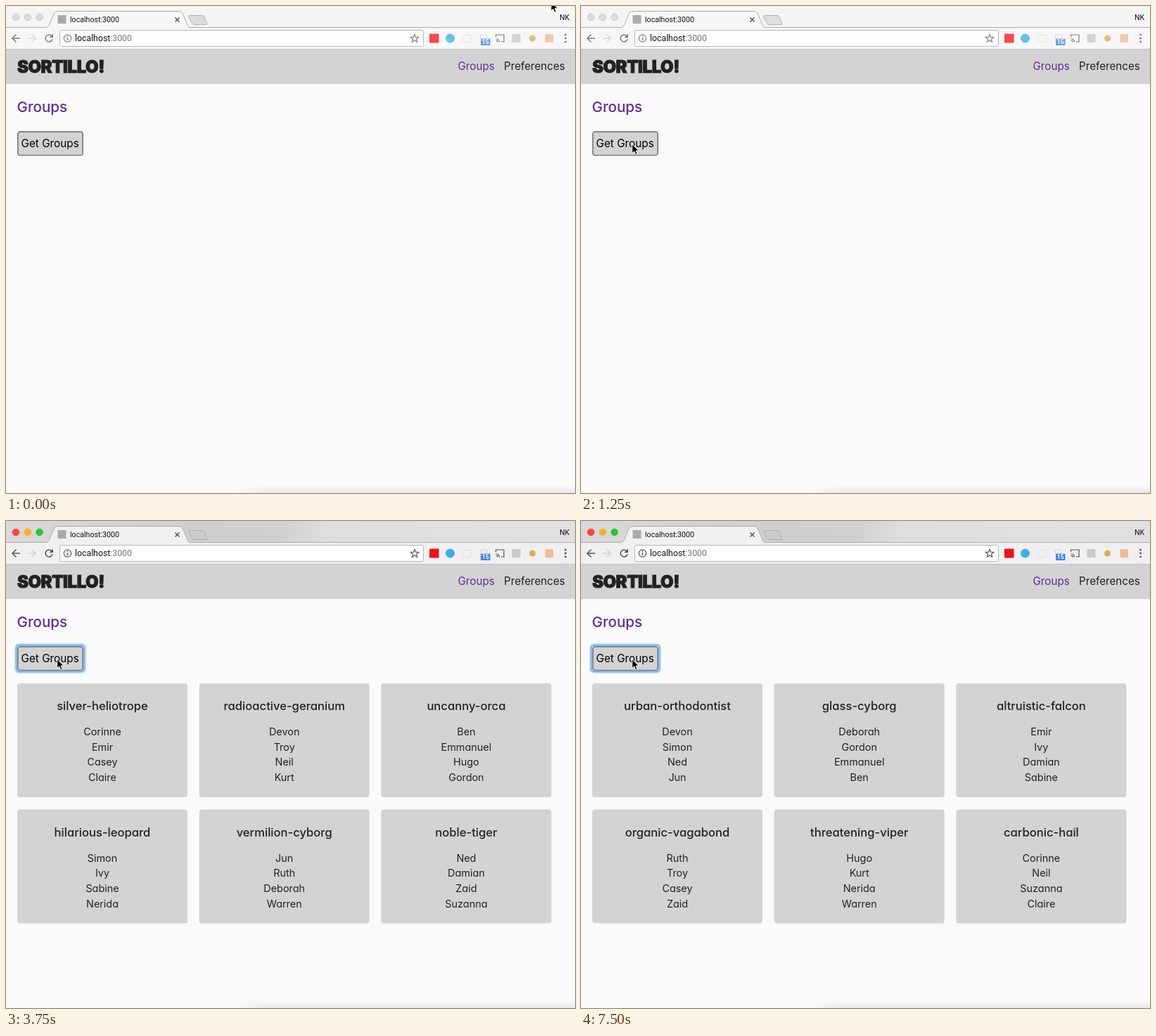
Recreate the animation shown at these times as an HTML page. Size 809 by 693 pixels, loop 8 s.

```html
<!DOCTYPE html>
<html lang="en">
<head>
<meta charset="utf-8">
<title>Groups</title>
<style>
  html, body { margin: 0; width: 100%; height: 100%; overflow: hidden; background: #fafafa; }
  svg { display: block; width: 809px; height: 693px; }
  text { font-family: Inter, "Open Sans", sans-serif; font-feature-settings: "cv11"; fill: #212121; }
  .ui { font-family: Roboto, "Liberation Sans", sans-serif; fill: #111; }
  .logo { font-size: 24px; font-weight: 900; letter-spacing: -.5px; stroke: #212121; stroke-width: .9px; }
  .nav { font-size: 15.2px; }
  .title { font-size: 20.6px; font-weight: 500; }
  .head { font-size: 16.6px; font-weight: 500; text-anchor: middle; }
  .name { font-size: 14.4px; text-anchor: middle; }
  .purple { fill: #5f2c97; }
  .line { fill: none; stroke: #555; stroke-width: 1.5; }
</style>
</head>
<body>
<svg viewBox="0 0 809 693">
  <defs>
    <linearGradient id="strip">
      <stop offset="0" stop-color="#dad8d8"/>
      <stop offset=".33" stop-color="#d0cecf"/>
      <stop offset=".48" stop-color="#d1cfcf"/>
      <stop offset=".56" stop-color="#dfdddd"/>
      <stop offset="1" stop-color="#e2e0e0"/>
    </linearGradient>
    <linearGradient id="shade" x2="0" y2="1">
      <stop offset="0" stop-color="#000" stop-opacity="0"/>
      <stop offset="1" stop-color="#000" stop-opacity=".07"/>
    </linearGradient>
    <linearGradient id="fade">
      <stop offset="0" stop-color="#000"/>
      <stop offset=".1" stop-color="#fff"/>
    </linearGradient>
    <mask id="soft"><rect x="325" y="680" width="484" height="13" fill="url(#fade)"/></mask>
  </defs>

  <rect width="809" height="693" fill="#fafafa"/>
  <rect x="325" y="682" width="484" height="11" fill="url(#shade)" mask="url(#soft)"/>

  <!-- browser frame -->
  <rect id="bar" width="809" height="31"/>
  <rect id="tools" y="30" width="809" height="31"/>
  <path id="tab" d="M-1 30.5H57Q60 30 61.500 27L68 11Q69.500 7.500 73 7.500H247Q250 7.500 251.500 11L258 27Q259.500 30.500 262 30.500H810" stroke="#acacac"/>
  <path id="plus" d="M261 13.500H279Q281 13.500 282 15.500L286 25Q286.500 26.500 285 26.500H267.500Q265.500 26.500 264.500 24.500L259.500 15Q259 13.500 261 13.500Z" stroke="#b2b2b2"/>
  <g id="lights"></g>
  <rect x="73.500" y="13" width="12" height="12" fill="#aaa"/>
  <text class="ui" x="91" y="23" font-size="10.65">localhost:3000</text>
  <path class="line" d="M240.500 16.500l6 6m0-6l-6 6"/>
  <text class="ui" x="787" y="20" font-size="10.6">NK</text>

  <rect x="76.500" y="34.500" width="517" height="23" rx="2" fill="#fff" stroke="#b7b7b7"/>
  <text class="ui" x="98" y="50.300" font-size="12.3">localhost<tspan fill="#777">:3000</tspan></text>
  <g id="icons">
    <path class="line" d="M20 46H9m5.500-5.500L9 46l5.500 5.500"/>
    <path class="line" style="stroke:#d2d2d2" d="M31 46H42m-5.500-5.500L42 46l-5.500 5.500"/>
    <path class="line" d="M65.200 43A5 5 0 1 0 66 47.200"/>
    <path d="M67 39.500V45h-5.500Z" fill="#555"/>
    <circle class="line" cx="87.500" cy="46" r="5.200" style="stroke-width:1.2"/>
    <path class="line" d="M87.500 45v4m0-6.500v1.500"/>
    <path id="star" class="line" style="stroke-width:1.2"/>
    <rect x="602" y="39.500" width="13.500" height="13" rx="1" fill="#f50f17"/>
    <circle cx="631.500" cy="46" r="6.500" fill="#37b0e8"/>
    <rect x="649.500" y="41.500" width="12" height="10" rx="2" fill="none" stroke="#dedede"/>
    <path d="M674.500 47v-6h9v5" fill="none" stroke="#d4d4d4"/>
    <rect x="675" y="46.500" width="13.500" height="9.500" rx="1" fill="#4285e8"/>
    <text class="ui" x="681.700" y="54.300" font-size="8.5" font-weight="700" text-anchor="middle" style="fill:#fff">15</text>
    <path class="line" style="stroke-width:1.2" d="M696.500 44v-3h11.500v10h-4M696.500 46.500a5 5 0 0 1 5 5M696.500 49a2.500 2.500 0 0 1 2.500 2.500"/>
    <rect x="719.500" y="40" width="12" height="12" fill="#c9c9c9"/>
    <circle cx="748.500" cy="46" r="4.500" fill="#e6a94e"/>
    <rect x="766.500" y="40" width="11.500" height="12" rx="1" fill="#f0bb95"/>
    <g fill="#555"><circle cx="795.500" cy="41" r="1.400"/><circle cx="795.500" cy="46" r="1.400"/><circle cx="795.500" cy="51" r="1.400"/></g>
  </g>

  <!-- page -->
  <rect y="61" width="809" height="50" fill="#d3d3d3"/>
  <path d="M0 61.500H809" stroke="#c2c2c2"/>
  <text class="logo" x="16" y="95.300">SORTILLO!</text>
  <text class="nav purple" x="642.500" y="91.300">Groups</text>
  <text class="nav" x="708" y="91.300">Preferences</text>
  <text class="title purple" x="15.500" y="150.500">Groups</text>
  <g id="focus" fill="none" stroke="#6fb1f7">
    <rect x="13.500" y="175.500" width="99" height="40" rx="5" stroke-width="3" opacity=".4"/>
    <rect x="14.700" y="176.700" width="96.600" height="37.600" rx="4" stroke-width="2"/>
  </g>
  <rect x="16.800" y="178.800" width="92.400" height="33.700" rx="3.500" fill="#d3d3d3" stroke="#7b7b7b" stroke-width="1.700"/>
  <text x="21.500" y="200.700" font-size="15.3" style="fill:#000">Get Groups</text>
  <g id="first"></g>
  <g id="second"></g>
  <path id="cursor" d="M0 0V13L3 10.300L5 15L7.300 14L5.300 9.500H9.300Z" fill="#000" stroke="#fff" stroke-width=".9"/>
</svg>
<script>
const $ = id => document.getElementById(id);

const make = (parent, tag, attrs, text) => {
  const el = document.createElementNS("http://www.w3.org/2000/svg", tag);
  for (const key in attrs) el.setAttribute(key, attrs[key]);
  if (text) el.textContent = text;
  parent.append(el);
  return el;
};

const rounds = {
  first: [
    "silver-heliotrope Corinne Emir Casey Claire",
    "radioactive-geranium Devon Troy Neil Kurt",
    "uncanny-orca Ben Emmanuel Hugo Gordon",
    "hilarious-leopard Simon Ivy Sabine Nerida",
    "vermilion-cyborg Jun Ruth Deborah Warren",
    "noble-tiger Ned Damian Zaid Suzanna"
  ],
  second: [
    "urban-orthodontist Devon Simon Ned Jun",
    "glass-cyborg Deborah Gordon Emmanuel Ben",
    "altruistic-falcon Emir Ivy Damian Sabine",
    "organic-vagabond Ruth Troy Casey Zaid",
    "threatening-viper Hugo Kurt Nerida Warren",
    "carbonic-hail Corinne Neil Suzanna Claire"
  ]
};

for (const id in rounds) {
  rounds[id].forEach((line, i) => {
    const [head, ...names] = line.split(" ");
    const x = 16 + (i % 3) * 258.7;
    const y = 231 + Math.floor(i / 3) * 179.5;
    const mid = x + 121;
    make($(id), "rect", { x, y, width: 242, height: 162, rx: 4, fill: "#d3d3d3" });
    make($(id), "text", { class: "head", x: mid, y: y + 38 }, head);
    names.forEach((name, row) =>
      make($(id), "text", { class: "name", x: mid, y: y + 74 + row * 21.7 }, name));
  });
}

const lights = ["#fb443e", "#fdb024", "#1cc93a"].map((color, i) => ({
  color,
  el: make($("lights"), "circle", { cx: 14 + i * 16.8, cy: 16, r: 4.8 })
}));

const points = Array.from({ length: 10 }, (_, i) => {
  const angle = i * Math.PI / 5, r = i % 2 ? 2.6 : 6;
  return [581 + r * Math.sin(angle), 46.3 - r * Math.cos(angle)];
});
$("star").setAttribute("d", "M" + points.join("L") + "Z");

// pointer steps: time, x, y
const path = [
  [0, 775, -6], [500, 89.7, 177], [750, 76.5, 184.500],
  [1000, 72.7, 193.500], [1250, 72.7, 196.500]
];

function draw(t) {
  const active = t >= 2000;
  const show = (id, on) => $(id).setAttribute("visibility", on ? "visible" : "hidden");
  const fill = (id, on, off) => $(id).setAttribute("fill", active ? on : off);

  fill("bar", "url(#strip)", "#f5f5f5");
  fill("tools", "#f1f0f0", "#f7f7f7");
  fill("tab", "#f1f0f0", "#f7f7f7");
  fill("plus", "#cbc9c9", "#dddddd");
  $("icons").setAttribute("opacity", active ? 1 : .75);
  for (const { el, color } of lights) {
    el.setAttribute("fill", active ? color : "#dcdcdc");
    el.setAttribute("stroke", active ? color : "#cacaca");
  }

  show("focus", t >= 3750);
  show("first", t >= 3750 && t < 7000);
  show("second", t >= 7000);
  const [, x, y] = path.filter(step => step[0] <= t).pop();
  $("cursor").setAttribute("transform", `translate(${x} ${y})`);
}

function tick() {
  draw(performance.now() % 8000);
  requestAnimationFrame(tick);
}
tick();
</script>
</body>
</html>
```
